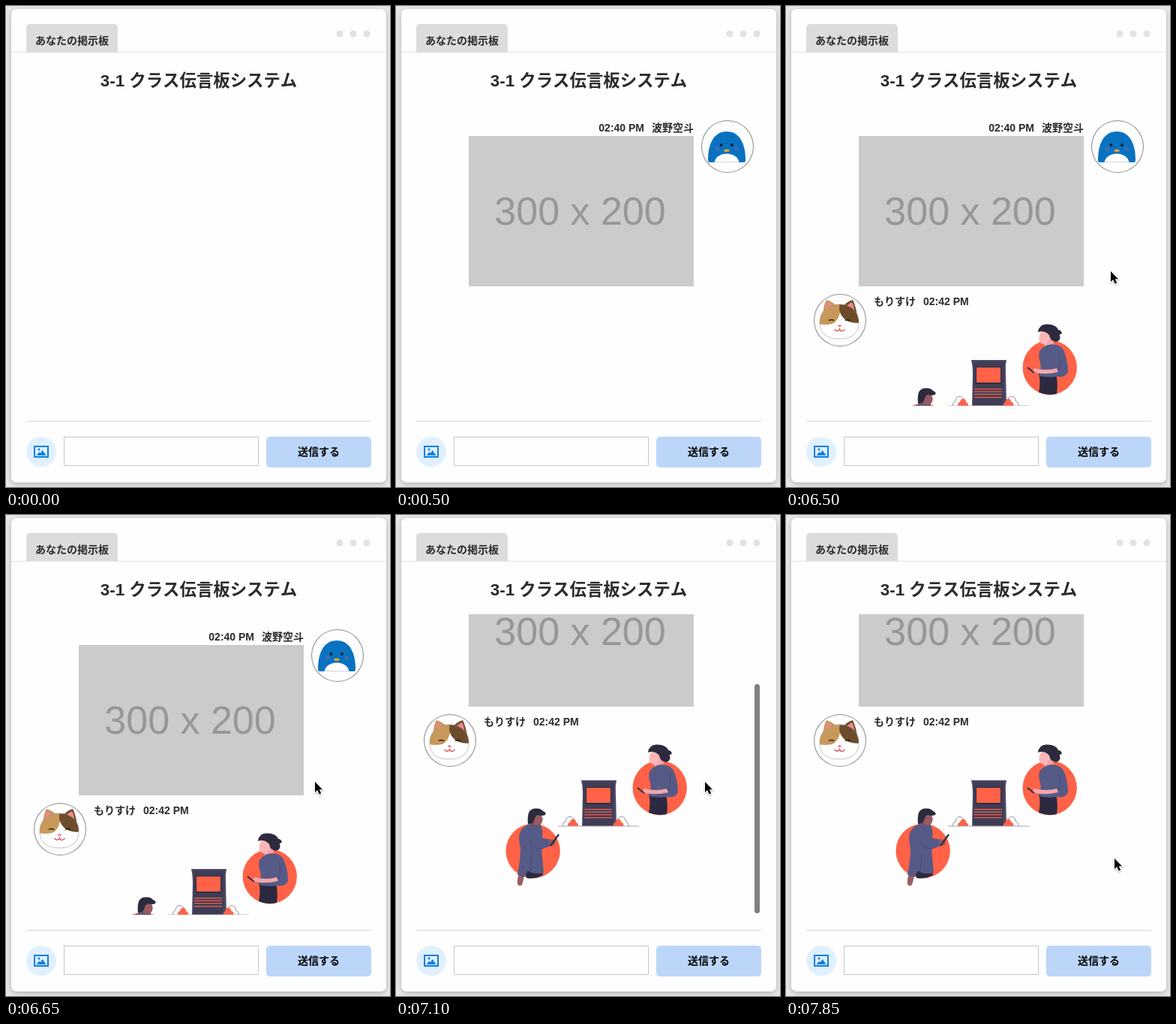
Recreate the animation shown at these times as an HTML page with a canvas. Size 512x640 px, loop 8000 ms.

```html
<!DOCTYPE html>
<html lang="ja">
<head>
<meta charset="utf-8">
<title>掲示板</title>
<style>
html, body { margin: 0; width: 100%; height: 100%; overflow: hidden; background: #e7e7e9; }
canvas { display: block; width: 512px; height: 640px; }
</style>
</head>
<body>
<canvas id="stage" width="512" height="640"></canvas>
<script>
const ctx = document.getElementById('stage').getContext('2d');
const SANS = '"Liberation Sans", "Noto Sans CJK JP", "Noto Sans CJK", sans-serif';
const LOOP = 8000;
const INK = '#2b2b2b', CORAL = '#ff6247', NAVY = '#565a87', DARK = '#2c2a3d', KIOSK = '#3f3d56';

// Screen states: start time, messages shown, scroll offset, scrollbar opacity, cursor tip
const STATES = [
  { at: 0,    shown: 0, scroll: 0,   bar: 0 },
  { at: 500,  shown: 1, scroll: 0,   bar: 0 },
  { at: 4550, shown: 2, scroll: 0,   bar: 0 },
  { at: 6500, shown: 2, scroll: 0,   bar: 0,   cursor: [433, 353] },
  { at: 6650, shown: 2, scroll: 0,   bar: 0,   cursor: [412, 355] },
  { at: 6950, shown: 2, scroll: 60,  bar: 1,   cursor: [412, 355] },
  { at: 7100, shown: 2, scroll: 118, bar: 1,   cursor: [412, 355] },
  { at: 7700, shown: 2, scroll: 118, bar: 0.5, cursor: [412, 355] },
  { at: 7850, shown: 2, scroll: 118, bar: 0,   cursor: [438, 457] }
];

function rect(x, y, w, h, color) {
  ctx.fillStyle = color;
  ctx.fillRect(x, y, w, h);
}

function round(x, y, w, h, r, color) {
  ctx.beginPath();
  ctx.roundRect(x, y, w, h, r);
  ctx.fillStyle = color;
  ctx.fill();
}

function oval(x, y, rx, ry, color, turn = 0) {
  ctx.beginPath();
  ctx.ellipse(x, y, rx, ry, turn, 0, Math.PI * 2);
  ctx.fillStyle = color;
  ctx.fill();
}

function shape(d, color) {
  ctx.fillStyle = color;
  ctx.fill(new Path2D(d));
}

function line(d, color, width = 1) {
  ctx.strokeStyle = color;
  ctx.lineWidth = width;
  ctx.stroke(new Path2D(d));
}

function label(str, x, y, size, align = 'left', color = INK, weight = 'bold') {
  ctx.font = `${weight} ${size}px ${SANS}`;
  ctx.textAlign = align;
  ctx.fillStyle = color;
  ctx.fillText(str, x, y);
}

function ring(x, y) {
  oval(x, y, 35, 35, '#8c8c8c');
  oval(x, y, 34, 34, '#fefefe');
}

function panel() {
  rect(0, 0, 512, 640, '#e7e7e9');
  ctx.save();
  ctx.shadowColor = 'rgba(0,0,0,.25)';
  ctx.shadowBlur = 6;
  ctx.shadowOffsetY = 2;
  round(7, 4, 500, 630, 7, '#fefefe');
  ctx.restore();
  round(27, 24, 122, 37, [5, 5, 0, 0], '#dcdcdc');
  rect(7, 61, 500, 1, '#e2e2e2');
  for (const x of [445, 463, 481]) oval(x, 37, 4.5, 4.5, '#e2e2e2');
  label('あなたの掲示板', 39, 51, 14);
  label('3-1 クラス伝言板システム', 257, 107, 22.4, 'center');
}

function footer() {
  rect(27, 552, 460, 1, '#d9d9d9');
  oval(47, 593, 20, 20, '#e0f0ff');
  line('M38 586H56V600H38Z', '#0a7fe6', 2);
  shape('M40.5 598L44.3 593.6L46 595L48.6 591L53.5 598Z', '#0a7fe6');
  oval(44, 590, 1.5, 1.5, '#0a7fe6');
  line('M77.5 573.5H336.5V611.5H77.5Z', '#c6c6c6');
  round(347, 573, 140, 41, 5, '#bbd6f8');
  label('送信する', 417, 598, 14, 'center', '#000');
}

function penguin() {
  ring(442, 187);
  shape('M418 208Q416 208 416 205C416 183 424 167 441 167C458 167 466 183 466 205Q466 208 464 208Z', '#0872c0');
  shape('M424.5 208C427 192.5 455 192.5 457.5 208Z', '#fff');
  line('M425 207.8H458', '#b9c6d4', 0.8);
  oval(428.5, 190, 3, 2.8, '#3d6db4');
  oval(454, 190, 3, 2.8, '#3d6db4');
  oval(433.5, 185, 1.9, 1.9, '#161c2c');
  oval(448, 185, 1.9, 1.9, '#161c2c');
  shape('M436.5 192.5Q441 188.5 445.5 192.5Q441 196 436.5 192.5Z', '#f3a12c');
}

function cat() {
  ring(72, 418);
  const head = 'M71 397C88 397 97 408 97 421C97 435 88 443 71 443C54 443 45 435 45 421C45 408 54 397 71 397Z';
  shape('M49 413Q50 397 54 391Q62 393 69 401Z', '#c8985a');
  shape('M52 406Q53 398 55 394Q60 396 64 400Z', '#ef8790');
  shape('M75 400Q82 393 89 391Q93 399 95 412Z', '#6d4c2b');
  shape('M80 400Q85 395 88 394Q91 399 91 406Z', '#ef8790');
  shape(head, '#fff');
  ctx.save();
  ctx.clip(new Path2D(head));
  shape('M40 395H73V402C72 412 68 421 61 423Q52 425 44 423Z', '#c8985a');
  shape('M72 395H100V421Q92 423 84 420C76 417 71 409 71 402Z', '#6d4c2b');
  ctx.restore();
  line(head, 'rgba(130,120,110,.55)', 0.8);
  line('M57 418.5Q60.5 416.5 64 418.5M79 418.5Q82.5 416.5 86 418.5', '#2d2119', 1.5);
  oval(71.5, 425.5, 2.2, 1.5, '#ef7d83');
  line('M64.5 430Q66 433 69 432Q71 431.5 71.5 430Q72 432 74 432.4Q77 433 78.5 430', '#dc5960', 1.5);
}

function firstPost() {
  label('02:40 PM', 331, 167, 14, 'right');
  label('波野空斗', 397, 167, 14, 'right');
  rect(97, 173, 300, 200, '#cbcbcb');
  label('300 x 200', 131.3, 290.5, 52, 'left', '#979797', 'normal');
  penguin();
}

function kiosk() {
  shape('M247 471H294Q292 479 293 488L294 532H248L249 488Q249 479 247 471Z', '#4c4966');
  shape('M250 473H291L290 532H250Z', KIOSK);
  rect(253, 480, 34, 23, '#2f2e41');
  rect(254, 481, 32, 20, CORAL);
  for (const y of [509, 512.5, 516, 520]) rect(251, y, 37, 1.4, '#e65c49');
  const bush = 'M222 532Q222 527 226 526Q227 519 232 519.5Q237 520 237 526';
  for (const flip of [1, -1]) {
    ctx.save();
    ctx.translate(flip > 0 ? 0 : 540 - 0.5, 0);
    ctx.scale(flip, 1);
    if (flip < 0) ctx.translate(7, 0);
    line(bush, '#8b8a99', 0.9);
    shape('M229 532Q229 527 232 527Q233 522.5 236.5 522.5Q240 523 240 527Q243 528 243 532Z', CORAL);
    ctx.restore();
  }
  line('M216 532H324', '#a9a8b4', 1);
}

function woman() {
  oval(351.7, 481, 36.2, 36.2, CORAL);
  shape('M337 489H360Q363 503 361 516Q349 519 337 514Q340 501 337 489Z', '#2b2940');
  shape('M346 441L356 441L357 453L344 455Z', '#f2a6a8');
  oval(344.5, 441, 7, 9.2, '#fbb6b8', 0.15);
  shape('M336 434Q337 424 347 423.5Q360 423 363 431Q367 431 368 436Q364 436 364 441Q363 447 358 446Q352 445 351 438Q345 431 336 434Z', DARK);
  oval(360, 441, 5.5, 5.7, DARK);
  shape('M338 459Q344 451 354 450Q367 450 371 460Q376 473 376 487Q372 495 362 493Q349 495 337 492Q341 481 339 474Q336 467 338 459Z', NAVY);
  line('M364 461Q368 476 362 486', '#484b75', 1);
  shape('M363 487Q347 491 333 488L328 486L331 482Q347 486 361 482Z', '#f3a7aa');
  line('M322 481L331 488', '#2f2e41', 2);
}

function man() {
  oval(182.6, 565, 36.2, 36.2, CORAL);
  shape('M171 588H194L196 597Q185 603 174 601Z', '#2b2940');
  shape('M164 595L171 597Q170 604 168 610Q164 613 162 609Q161 604 164 595Z', '#985d63');
  shape('M181 519H191L193 532H180Z', '#85484e');
  oval(189, 523.5, 6.5, 8, '#985a60', 0.2);
  shape('M176 529Q175 520 177 514Q180 508 187 508.5Q193 508 196 512Q201 514 199 517Q194 519 189 517Q185 519 184 525Q181 530 176 529Z', DARK);
  shape('M178 529Q186 532 192 530Q197 536 195 548L208 550L211 556L194 563L197 594Q190 596 180 594L176 591L171 600L162 597Q166 575 166 562L164 550Q163 535 178 529Z', NAVY);
  line('M179 551Q182 563 195 562M181 570L179 592', '#484b75', 1);
  shape('M204 552Q208 547 213 552L212 557L206 559Z', '#985a60');
  line('M206 558L217 543', '#2f2e41', 2.2);
}

function secondPost() {
  cat();
  label('もりすけ', 117, 398, 14);
  label('02:42 PM', 183, 398, 14);
  woman();
  kiosk();
  man();
}

function messages(state) {
  ctx.save();
  ctx.beginPath();
  ctx.rect(27, 132, 460, 400);
  ctx.clip();
  ctx.translate(0, -state.scroll);
  if (state.shown > 0) firstPost();
  if (state.shown > 1) secondPost();
  ctx.restore();
  if (state.bar) {
    ctx.globalAlpha = state.bar;
    round(478, Math.round(134 + state.scroll * 0.772), 7, 305, 3.5, '#808080');
    ctx.globalAlpha = 1;
  }
}

function pointer([x, y]) {
  ctx.save();
  ctx.translate(x, y);
  const arrow = new Path2D('M0 0V14L3.2 11.1L5.6 16.6L8.2 15.5L5.8 10.2H10Z');
  ctx.shadowColor = 'rgba(0,0,0,.3)';
  ctx.shadowBlur = 2;
  ctx.shadowOffsetY = 1;
  ctx.strokeStyle = '#fff';
  ctx.lineWidth = 2;
  ctx.stroke(arrow);
  ctx.shadowColor = 'transparent';
  ctx.fillStyle = '#000';
  ctx.fill(arrow);
  ctx.restore();
}

function draw(now) {
  const t = now % LOOP;
  const state = STATES.filter(s => s.at <= t).pop();
  panel();
  messages(state);
  footer();
  if (state.cursor) pointer(state.cursor);
}

const start = performance.now();
function tick() {
  draw(performance.now() - start);
  requestAnimationFrame(tick);
}
tick();
</script>
</body>
</html>
```
